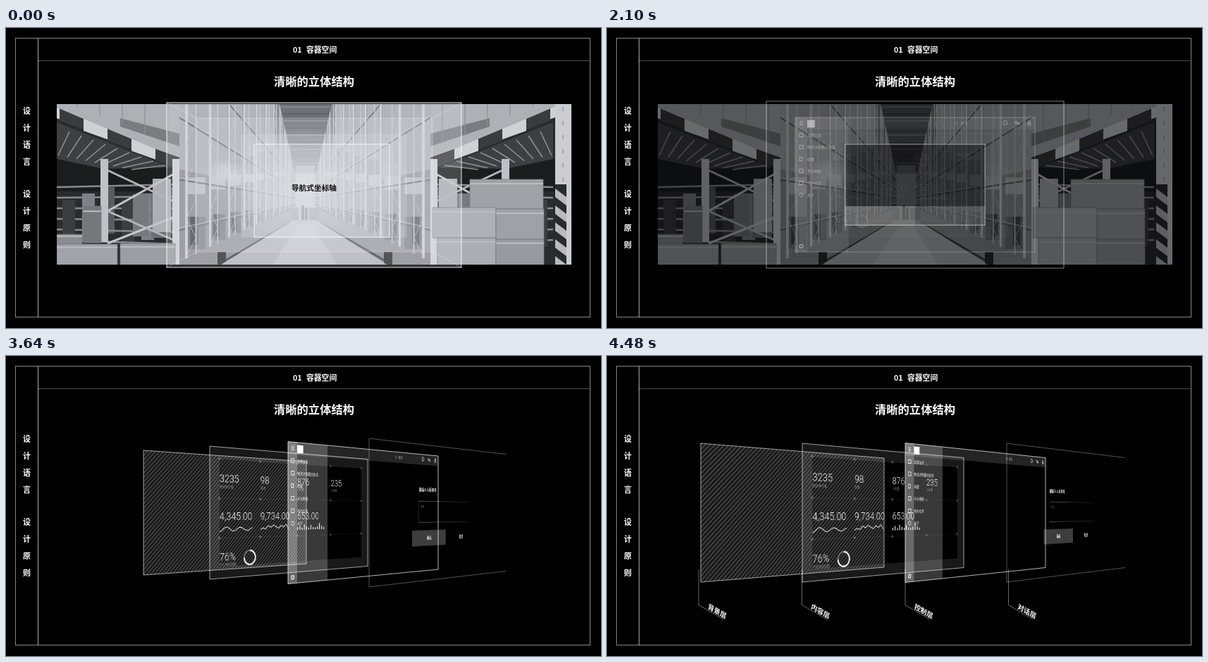
Write an HTML page that moves like this. It is 844 by 426 pixels and loops after 4.55 s.

```html
<!DOCTYPE html>
<html lang="zh-CN">
<head>
<meta charset="utf-8">
<title>容器空间</title>
<style>
  html, body { margin: 0; width: 100%; height: 100%; overflow: hidden; background: #000; }
  #stage { position: relative; width: 844px; height: 426px; overflow: hidden; background: #000; }
  svg { position: absolute; left: 0; top: 0; overflow: visible;
        font-family: "Noto Sans CJK SC", "Noto Sans CJK", sans-serif; }
  .layer { transform-origin: 0 0; }
  .num { font-family: Roboto, sans-serif; font-weight: 300; font-size: 19px; }
</style>
</head>
<body>
<div id="stage">
  <svg id="photo" width="844" height="426"></svg>
  <svg id="back" class="layer" width="400" height="225"></svg>
  <svg id="content" class="layer" width="400" height="225"></svg>
  <svg id="control" class="layer" width="400" height="225"></svg>
  <svg id="dialog" class="layer" width="400" height="225"></svg>
  <svg id="chrome" width="844" height="426"></svg>
</div>
<script>
const LOOP = 4550, STEP = 70, MID_Y = 222.5, W = 400, H = 225;
const $ = id => document.getElementById(id);
const range = n => [...Array(n).keys()];
const each = (list, draw) => list.map(draw).join('');

const rect = (x, y, w, h, fill, more = '') =>
  `<rect x="${x}" y="${y}" width="${w}" height="${h}" fill="${fill}" ${more}/>`;
const box = (x, y, w, h, stroke, more = '') => rect(x, y, w, h, 'none', `stroke="${stroke}" ${more}`);
const poly = (points, fill, more = '') => `<polygon points="${points}" fill="${fill}" ${more}/>`;
const path = (d, stroke, width = 1, more = '') =>
  `<path d="${d}" fill="none" stroke="${stroke}" stroke-width="${width}" ${more}/>`;
const text = (x, y, size, str, more = '') =>
  `<text x="${x}" y="${y}" font-size="${size}" fill="#fff" ${more}>${str}</text>`;
const BOLD = 'font-weight="700"', CENTERED = BOLD + ' text-anchor="middle"';

// Monotone cubic through (times, values), flat at both ends.
function curve(times, values, t) {
  const last = times.length - 1;
  if (t <= times[0]) return values[0];
  if (t >= times[last]) return values[last];
  const secant = i => (values[i + 1] - values[i]) / (times[i + 1] - times[i]);
  const slope = i => {
    if (i === 0 || i === last) return 0;
    const a = secant(i - 1), b = secant(i);
    return a * b <= 0 ? 0 : 2 * a * b / (a + b);
  };
  const i = times.findIndex(v => v > t) - 1;
  const span = times[i + 1] - times[i], p = (t - times[i]) / span, q = 1 - p;
  return values[i] * q * q * (1 + 2 * p) + values[i + 1] * p * p * (3 - 2 * p)
    + span * p * q * (slope(i) * q - slope(i + 1) * p);
}

/* ---------- warehouse picture ---------- */
// One side of the aisle; d is the distance from the aisle's centre line.
function rackSide(s) {
  const X = d => 424 + s * d;
  const pts = list => list.map(([d, y]) => `${X(d)},${y}`).join(' ');
  const line = (a, b, color, w) => path(`M${X(a[0])} ${a[1]}L${X(b[0])} ${b[1]}`, color, w);
  const bar = (d, w, y, h, fill) => rect(Math.min(X(d), X(d + w)), y, w, h, fill);
  const beamTop = d => 186 - (d - 178) * 0.42;
  const beam = (a, b, fill) =>
    poly(pts([[a, beamTop(a)], [b, beamTop(b)], [b, beamTop(b) + 17], [a, beamTop(a) + 15]]), fill);
  const uprights = range(10).map(i => 168 * 0.8 ** i);
  const aisle = poly(pts([[14, 108], [180, 108], [180, 336], [118, 336], [16, 274]]), '#8b8d92')
    + poly(pts([[110, 108], [180, 108], [180, 200], [110, 215]]), '#a9abb0')
    + each(uprights, d => {
        const k = d / 168, w = d * .16;
        return bar(d - w - 3 * k, w, 108, 90 * k ** .3, k > .3 ? '#a4a6ab' : '#77797e')
          + bar(d - w, w, 202 + 10 * k, 24 * k, '#b6b8bd')
          + bar(d - w, w, 250 + 18 * k, 46 * k, '#707277')
          + bar(d - w * .6, w * .4, 250 + 18 * k, 40 * k, '#46484c');
      })
    + each([-2.6, -1.4, -.35, .5], y => line([14, 245 + y * 11], [180, 245 + y * 85], '#5e6065', 2)
        + line([14, 243 + y * 11], [180, 242 + y * 85], '#bcbec3', 1))
    + each(uprights, d => {
        const k = d / 168, inner = d * .92;
        const lace = range(9).map(i => `${X(i % 2 ? inner : d)} ${108 + i * (137 + 80 * k) / 8}`);
        return line([d, 108], [d, 245 + 82 * k], '#cdcfd4', .8 + 3 * k)
          + line([inner, 108], [inner, 245 + 76 * k], '#c0c2c7', .8 + k)
          + path('M' + lace.join('L'), '#b9bbc0', .8);
      })
    + line([20, 276], [116, 332], '#3e4044', 3);
  const store = bar(178, 202, 108, 228, '#2a2b2e')
    + bar(178, 202, 186, 46, '#1b1c1e')
    + each(range(6), i => line([180, 222 + i * 17], [352, 226 + i * 15], '#8a8c90', 2.5)
        + bar(186 + i * 28, 18, 226 + i % 3 * 9, 66, ['#595b5f', '#7f8186', '#3c3d40'][i % 3]))
    + bar(190, 28, 236, 62, '#6d6f73') + bar(190, 26, 214, 76, '#adafb4')
    + bar(222, 22, 236, 60, '#77797d')
    + poly(pts([[178, 108], [380, 108], [380, 112], [178, 184]]), '#aeb0b5')
    + poly(pts([[178, 150], [262, 128], [262, 140], [178, 168]]), '#7a7c80')
    + each(range(5), i => line([195 + i * 32, 108], [195 + i * 32, 164 - i * 13], '#8e9095', 1.2))
    + poly(pts([[190, 198], [352, 134], [352, 186], [285, 200]]), '#3e3f42')
    + each(range(9), i => line([198 + i * 17, 195 - i * 6], [246 + i * 13, 201 - i * 2.5], '#8f9195', 1.5))
    + each(range(6), i => beam(178 + i * 34, 212 + i * 34, i % 2 ? '#cfd1d5' : '#3a3b3e'))
    + each(range(2), i => line([182, 205 + i * 62], [280, 260 + i * 46], '#c3c5ca', 3)
        + line([182, 248 + i * 55], [280, 202 + i * 58], '#b4b6bb', 3))
    + bar(279, 11, 186, 118, '#bfc1c6') + bar(178, 10, 186, 150, '#d0d2d7')
    + bar(112, 12, 318, 18, '#2a2b2d');
  return aisle + store;
}

const carton = (x, y, w, h, fill) =>
  rect(x, y, w, h, fill, 'stroke="#77797d" stroke-width=".8"') + rect(x, y + h * .12, w, 2, '#bbbdc1');

const tunnel = [[228, 106, 418, 234, .9], [270, 128, 335, 190, .25], [334, 151, 234, 146, .15], [352, 165, 192, 132, .8]];

$('photo').innerHTML = `<defs>
  <clipPath id="crop"><rect x="72" y="108" width="730" height="228"/></clipPath>
  <radialGradient id="haze"><stop offset="0" stop-color="#e4e6ea" stop-opacity=".6"/>
    <stop offset="1" stop-color="#e4e6ea" stop-opacity="0"/></radialGradient></defs>
  <g id="scene" clip-path="url(#crop)">`
  + rect(72, 108, 730, 228, '#9b9da2') + rackSide(-1) + rackSide(1)
  + poly('388,108 462,108 440,205 410,205', '#4d4f53')
  + each(range(9), i => path(`M${390 + i * 2} ${112 + i * 10}H${460 - i * 2}`, i % 2 ? '#2f3033' : '#8b8d91'))
  + rect(411, 195, 27, 77, '#b9bbc0') + rect(411, 195, 27, 12, '#8f9196')
  + poly('406,274 442,274 540,336 305,336', '#b4b6bb')
  + poly('414,280 434,280 470,336 378,336', '#c9cbd0', 'opacity=".7"')
  + `<ellipse cx="318" cy="206" rx="36" ry="22" fill="url(#haze)"/>`
  + rect(405, 255, 10, 17, '#75777b') + rect(430, 255, 14, 17, '#707276')
  + rect(419, 252, 4, 20, '#36383b') + rect(424, 255, 4, 17, '#45474a')
  + carton(110, 253, 25, 52, '#75777b') + carton(72, 293, 36, 14, '#8b8d91')
  + carton(72, 307, 86, 30, '#a1a3a8') + carton(162, 306, 78, 31, '#9c9ea3')
  + carton(658, 215, 104, 42, '#a0a2a7') + carton(605, 255, 90, 43, '#afb1b6')
  + carton(695, 257, 68, 43, '#9fa1a6') + carton(612, 298, 83, 39, '#abadb2') + carton(695, 300, 68, 37, '#989a9f')
  + rect(779, 108, 24, 228, '#cbcdd2') + rect(779, 222, 16, 114, '#2a2b2d')
  + each(range(5), i => poly(`779,${228 + i * 24} 795,${240 + i * 24} 795,${252 + i * 24} 779,${240 + i * 24}`, '#b9bbc0'))
  + path('M790 112V218', '#999ba0', 1.5, 'stroke-dasharray="6 14"')
  + `</g><g id="tunnel">`
  + `<ellipse cx="422" cy="225" rx="130" ry="90" fill="url(#haze)"/>`
  + each(tunnel, ([x, y, w, h, o]) => rect(x, y, w, h, '#dfe2e8', 'fill-opacity=".22"')
      + box(x, y, w, h, '#fff', `stroke-opacity="${o}"`))
  + path('M228 106L270 128M646 106L605 128M228 340L270 318M646 340L605 318', '#fff', .7, 'opacity=".4"')
  + `</g>` + `<text id="axis" x="437" y="231" font-size="10.7" ${CENTERED} fill="#111">导航式坐标轴</text>`;

/* ---------- the four layers, each drawn on a 400 x 225 sheet ---------- */
$('back').innerHTML = `<defs><pattern id="hatch" width="5.6" height="5.6" patternUnits="userSpaceOnUse"
  patternTransform="rotate(45)">` + rect(0, 0, 5.6, 5.6, '#141414') + rect(0, 0, 2.2, 5.6, '#484848')
  + `</pattern></defs>` + rect(0, 0, W, H, 'url(#hatch)');

const columns = [20, 110, 200, 290, 380], rows = [20, 88, 156];
const figure = (x, y, value, label = '', dy = 10) =>
  text(x, y, 19, value, 'class="num"') + text(x, y + dy, 6, label, 'opacity=".5"');
const wave = range(37).map(i => `${20 + i * 2},${(141 - 4 * Math.sin(i * .42 - 1.6) * (1 - i / 90)).toFixed(1)}`);
const zigzag = [143, 140, 142, 136, 139, 135, 138, 141, 136, 139, 134, 143].map((y, i) => `${110 + i * 6.2},${y}`);
$('content').innerHTML =
  path(`M0 0H${W}V${H}H0ZM20 20V205H380V20Z`, 'none', 0, 'style="fill:#fff;fill-opacity:.1" fill-rule="evenodd"')
  + each(rows, y => path(`M20 ${y}H380`, '#fff', .7, 'opacity=".1"')
    + each(columns, x => path(`M${x - 3} ${y}h6M${x} ${y - 3}v6`, '#fff', .9, 'opacity=".45"')))
  + figure(20, 60, '3235', '物流单号量') + figure(110, 60, '98', '签收')
  + figure(200, 60, '876', '入库量') + figure(290, 60, '235', '入库量')
  + figure(20, 125, '4,345.00') + figure(110, 125, '9,734.00') + figure(200, 125, '653.00')
  + figure(20, 195, '76%', '今日物流指数', 9)
  + `<polyline points="${wave.join(' ')}" fill="none" stroke="#fff" stroke-width="1.2"/>`
  + `<polyline points="${zigzag.join(' ')}" fill="none" stroke="#fff" stroke-width="1.2"/>`
  + each([5, 8, 4, 10, 6, 4, 9, 5, 4, 6, 12, 7, 4], (h, i) => rect(200 + i * 5.8, 145 - h, 2, h, '#fff'))
  + `<circle cx="86" cy="192" r="12.5" fill="none" stroke="#777" stroke-width="2.6"/>`
  + path('M86 179.5A12.5 12.5 0 1 1 73.5 192', '#fff', 2.8);

const menu = ['发票信息', '物流详情图文信息', '收藏', '平台网络', '待办任务', '关于'];
$('control').innerHTML = `<g id="fills">` + rect(0, 0, W, 20, '#fff', 'opacity=".14"')
  + rect(0, 0, 89, H, '#fff', 'opacity=".22"') + rect(0, 0, 20, H, '#fff', 'opacity=".24"') + `</g><g id="menu">`
  + path('M7 7h6M7 9.7h6M7 12.4h6', '#fff') + rect(20, 4, 13, 13, '#fff')
  + each(menu, (name, i) => {
      const y = 29.5 + i * 20;
      return box(7, y - 3, i === 2 ? 4.5 : 6, 6, '#fff', i === 5 ? 'rx="3"' : '') + text(20, y + 2.2, 5.9, name);
    })
  + `<circle cx="10" cy="215.5" r="2.8" fill="none" stroke="#fff" stroke-width="1.6"/>
     <circle cx="269" cy="9.5" r="2.2" fill="none" stroke="#fff" stroke-width=".7" opacity=".6"/>`
  + text(276, 11.7, 5.9, '搜索', 'opacity=".6"')
  + path('M348 12V8a2.8 2.8 0 0 1 5.6 0V12ZM367 7h3v3h-3zM371 9h3v3h-3zM388 13v-3h5v3z', '#fff', .9)
  + `<circle cx="390.5" cy="7.5" r="1.8" fill="none" stroke="#fff" stroke-width=".9"/></g>`;

$('dialog').innerHTML = rect(106, 58, 188, 109, '#000', 'id="card"')
  + rect(106, 141.5, 94, 26, '#fff', 'id="confirm"') + rect(200, 141.5, 94, 26, '#fff', 'id="cancel"')
  + box(106, 58, 188, 109, '#fff', 'id="rim" stroke-width="1.5"')
  + `<g id="form">` + text(124, 77, 7.1, '请输入入库单号', BOLD)
  + text(153, 157, 6.5, '确认', CENTERED) + text(247, 157, 6.5, '取消', CENTERED) + `</g><g id="field">`
  + `<defs><linearGradient id="fade"><stop offset="0" stop-color="#fff" stop-opacity=".4"/>
     <stop offset="1" stop-color="#fff" stop-opacity=".1"/></linearGradient></defs>`
  + rect(124, 93, 152, .9, 'url(#fade)') + rect(124, 128, 152, .9, 'url(#fade)')
  + path('M124.5 93V128', '#fff', .9, 'opacity=".3"') + text(129, 104, 5, '单号：', 'opacity=".4"') + `</g>`;

/* ---------- fixed frame, outlines and floor labels ---------- */
const side = (chars, y0) => each([...chars], (c, i) => text(29.5, y0 + i * 24 + 4, 11, c, CENTERED));
const floorLabels = ['背景层', '内容层', '控制层', '对话层'];
$('chrome').innerHTML = `<defs><linearGradient id="wipe" gradientUnits="userSpaceOnUse" x1="0" x2="0">
    <stop offset="0" stop-color="#fff"/><stop offset="1" stop-color="#fff" stop-opacity="0"/></linearGradient>
    <mask id="reveal" maskUnits="userSpaceOnUse" x="0" y="290" width="844" height="110">`
  + rect(0, 290, 844, 110, 'url(#wipe)') + `</mask></defs>`
  + box(13.5, 14.5, 815, 396, '#858585') + path('M45.5 14V411', '#a8a8a8')
  + path('M46 46.5H829', '#9a9a9a', 1, 'stroke-dasharray="1 1"')
  + text(407, 34.5, 10.8, '01', BOLD) + text(426, 34.5, 10.8, '容器空间', BOLD)
  + text(437, 82, 16.3, '清晰的立体结构', CENTERED)
  + side('设计语言', 118) + side('设计原则', 236)
  + each(['back', 'content', 'control', 'dialog'], n => path('', '#fff', 1, `id="${n}Edge"`))
  + path('', '#fff', 1, 'id="farEdge"')
  + `<g mask="url(#reveal)">` + each(floorLabels, (name, i) => {
      const x = 130 + i * 146.5;
      return path(`M${x} 303V353.5L${x + 35} 374`, '#fff', .8, 'opacity=".5"')
        + text(0, 0, 10, name, `${BOLD} transform="matrix(.86 .5 -.22 .95 ${x + 12.5} 358.5)"`);
    }) + `</g>`;

/* ---------- motion ---------- */
// Each pose: left x, left height, right x, right height.
const poses = {
  back:    [[330, 121, 545, 121], [311, 134, 516, 121], [195, 177, 426, 145], [143, 194, 397, 153], [133, 197, 393, 155]],
  content: [[305, 147, 568, 147], [304, 163, 547, 141], [289, 189, 513, 152], [279, 196, 507, 155], [277, 197, 506, 156]],
  control: [[267, 191, 607, 191], [293, 205, 593, 174], [400, 202, 613, 161], [422, 198, 621, 156], [423, 198, 622, 156]],
  dialog:  [[226, 237, 648, 237], [289, 249, 642, 205], [515, 211, 709, 166], [561, 199, 732, 156], [567, 197, 735, 156]]
};
const poseTimes = [2660, 3220, 3360, 3640, 4200, 4480];
for (const list of Object.values(poses))
  list.splice(2, 0, list[1].map((v, i) => v + .7 * (list[2][i] - v)));

const early = [1050, 1540, 2380, 3220, 3640];
const late = [1960, 2380, 3220, 3640];
const card = [1960, 2310, 2660, 3220, 3640];
const fades = {
  scene: [[1890, 2310], [1, 0]], tunnel: [[0, 1000], [1, 0]], axis: [[0, 560], [1, 0]],
  back: [late, [0, .4, .9, 1]], content: [[1750, 2380, 3220], [0, .38, .95]],
  fills: [early, [0, .25, .5, 1, 1]], menu: [early, [0, .7, .38, .9, 1]],
  card: [card, [0, 1, 1, .5, 0]], rim: [card, [0, 1, 1, .75, 0]],
  confirm: [card, [0, .87, .87, .5, .24]], cancel: [card, [0, .57, .57, .25, 0]],
  form: [[2730, 3220, 3640], [0, .4, .95]], field: [[3220, 3640], [0, 1]],
  backEdge: [late, [0, .3, .5, .6]], contentEdge: [late, [0, .22, .45, .6]],
  controlEdge: [early, [0, .2, .3, .6, .7]],
  dialogEdge: [card, [0, .95, .95, .5, .36]], farEdge: [card, [0, .95, .95, .45, 0]]
};

function place(name, t) {
  const [x0, h0, x1, h1] = range(4).map(i => curve(poseTimes, poses[name].map(p => p[i]), t));
  const k = h0 / h1 - 1;
  $(name).style.transform = `matrix3d(${[
    (x1 * (1 + k) - x0) / W, MID_Y * k / W, 0, k / W,
    0, h0 / H, 0, 0, 0, 0, 1, 0, x0, MID_Y - h0 / 2, 0, 1].map(v => v.toFixed(8))})`;
  const far = `${x1} ${MID_Y - h1 / 2}`, farLow = `${x1} ${MID_Y + h1 / 2}`;
  const open = name === 'dialog';
  $(name + 'Edge').setAttribute('d',
    `M${far}L${x0} ${MID_Y - h0 / 2}V${MID_Y + h0 / 2}L${farLow}${open ? '' : 'Z'}`);
  if (open) $('farEdge').setAttribute('d', `M${far}L${farLow}`);
}

function render(time) {
  const t = Math.floor(time % LOOP / STEP) * STEP;
  for (const name in poses) place(name, t);
  for (const id in fades) $(id).style.opacity = curve(...fades[id], t);
  const weight = curve([2660, 3220], [1.5, .9], t);
  for (const id of ['dialogEdge', 'farEdge']) $(id).setAttribute('stroke-width', weight);
  const edge = 300 + (t - 4000) * .35;
  $('wipe').setAttribute('y1', edge - 22);
  $('wipe').setAttribute('y2', edge);
}

const start = performance.now();
function tick() {
  render(performance.now() - start);
  requestAnimationFrame(tick);
}
tick();
</script>
</body>
</html>
```
